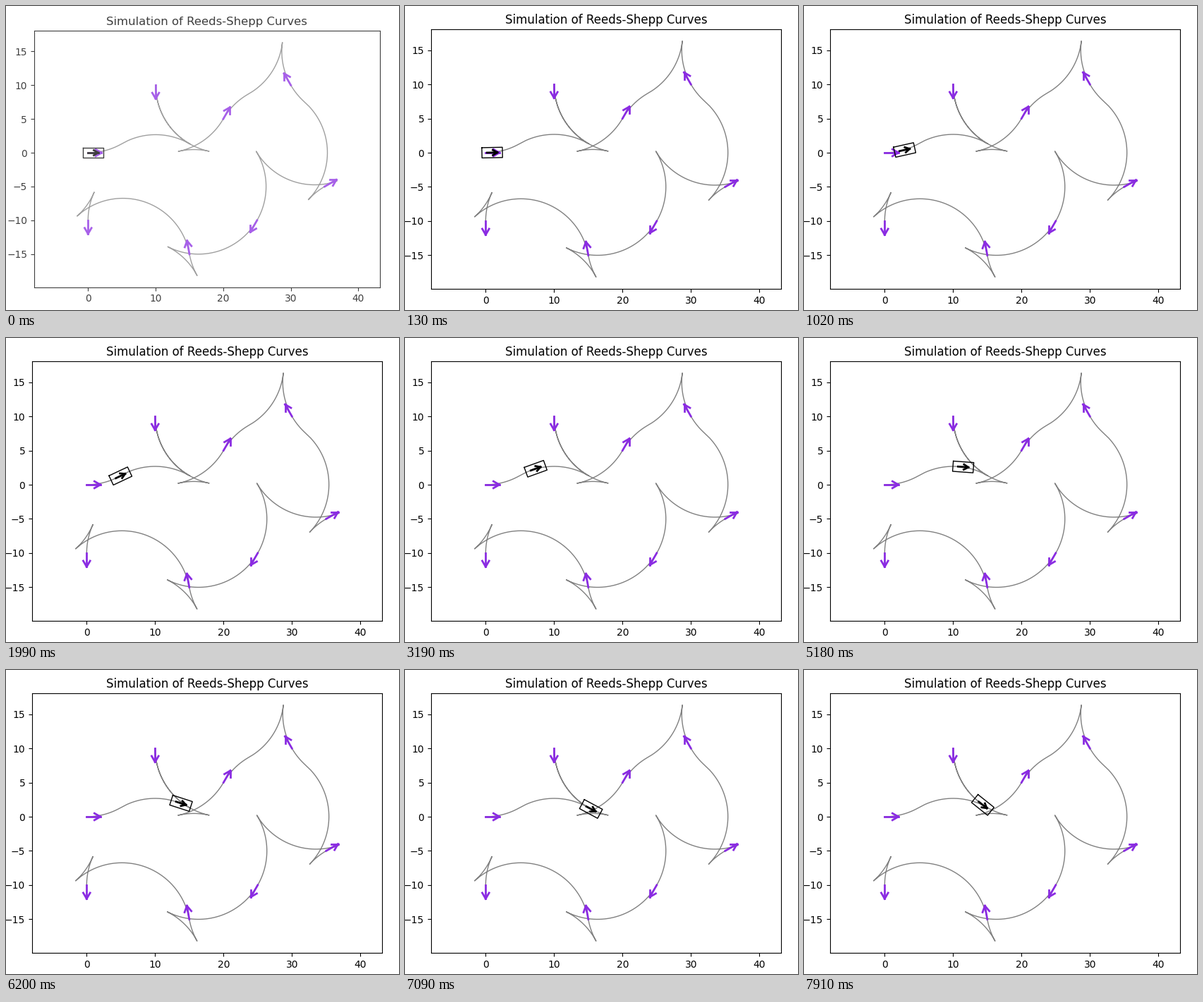
Animation, 557 px wide and 431 px high, one loop 8 s. Source, as a matplotlib script:

```python
import numpy as np
import matplotlib.pyplot as plt
from matplotlib.animation import FuncAnimation
from matplotlib.patches import Rectangle

W, H, DPI = 557, 431, 100
INTERVAL, LOOP = 20, 8000
RADIUS, STEP = 10.0, 0.2
CAR_W, CAR_L = 1.5, 3.0

STATES = [(0, 0, 0), (10, 10, -90), (20, 5, 60), (30, 10, 120),
          (35, -5, 30), (25, -10, -120), (15, -15, 100), (0, -10, -90)]

# per leg: outer turn (1 left, -1 right), side of the middle circle, gears
LEGS = [(1, -1, (1, 1, -1)), (1, 1, (1, -1, 1)), (-1, 1, (1, 1, -1)),
        (-1, -1, (-1, -1, 1)), (-1, -1, (1, -1, 1)), (-1, -1, (1, -1, 1)),
        (1, 1, (1, -1, 1))]

# (ms, path point reached by the car), linear in between
PACE = np.array([
    (0, 0), (130, 1), (260, 2), (840, 9), (920, 10), (1710, 19), (1810, 20),
    (1990, 22), (2550, 28), (2630, 29), (3190, 35), (3370, 37), (3470, 38),
    (4210, 46), (4310, 47), (5000, 55), (5130, 56), (5920, 65), (6020, 66),
    (6200, 68), (6710, 74), (6840, 75), (7630, 84), (7730, 85), (7910, 87)])

# axes box in pixels, and the window's opening zoom
BOX = (37, 30, 496, 368.06)
ZOOM, CENTER, OPEN_MS = 0.988, (277, 216), 50


def left_of(yaw):
    return np.array([-np.sin(yaw), np.cos(yaw)])


def leg_points(start, goal, turn, side, gears):
    """Three tangent arcs between two poses, sampled every STEP."""
    (p0, h0), (p3, h3) = [(np.array(s[:2], float), np.deg2rad(s[2]))
                          for s in (start, goal)]
    c1 = p0 + turn * RADIUS * left_of(h0)
    c3 = p3 + turn * RADIUS * left_of(h3)
    d = c3 - c1
    dist = np.hypot(*d)
    rise = np.sqrt(4 * RADIUS**2 - dist**2 / 4)
    c2 = (c1 + c3) / 2 + side * rise * np.array([-d[1], d[0]]) / dist

    def joint(c):
        n = -turn * (c2 - c)
        return np.arctan2(-n[0], n[1])

    heads = [h0, joint(c1), joint(c3), h3]
    points = [(*p0, h0)]
    pos = gears[0] * STEP
    for i, (c, gear) in enumerate(zip((c1, c2, c3), gears)):
        k = turn * (-1)**i
        length = RADIUS * ((k * gear * (heads[i + 1] - heads[i])) % (2 * np.pi))
        while abs(pos) <= length:
            yaw = heads[i] + k * pos / RADIUS
            points.append((*(c - k * RADIUS * left_of(yaw)), yaw))
            pos += gear * STEP
        pos -= gear * length  # leftover carries into the next arc
    points.append((*p3, h3))
    return points


def arrow_lines(x, y, yaw, size):
    tip = np.array([x + size * np.cos(yaw), y + size * np.sin(yaw)])
    lines = [([x, tip[0]], [y, tip[1]])]
    for spread in (-np.pi / 6, np.pi / 6):
        a = yaw + np.pi + spread
        lines.append(([tip[0], tip[0] + size / 2 * np.cos(a)],
                      [tip[1], tip[1] + size / 2 * np.sin(a)]))
    return lines


def car_outline(x, y, yaw):
    u = np.array([-1, -1, 3, 3, -1]) * CAR_L / 4
    v = np.array([1, -1, -1, 1, 1]) * CAR_W / 2
    c, s = np.cos(yaw), np.sin(yaw)
    return x + u * c - v * s, y + u * s + v * c


path = np.array([p for a, b, leg in zip(STATES, STATES[1:], LEGS)
                 for p in leg_points(a, b, *leg)])

# the small excess keeps the pixel size from rounding down
fig = plt.figure(figsize=((W + 0.01) / DPI, (H + 0.01) / DPI), dpi=DPI,
                 facecolor="white")
ax = fig.add_axes([0, 0, 1, 1])
title = ax.set_title("Simulation of Reeds-Shepp Curves")

ax.plot(path[:, 0], path[:, 1], lw=1, color="gray")
for x, y, deg in STATES:
    for xs, ys in arrow_lines(x, y, np.deg2rad(deg), 2):
        ax.plot(xs, ys, lw=2, color="blueviolet")
outline, = ax.plot([], [], lw=1, color="black")
pointer = [ax.plot([], [], lw=2, color="black")[0] for _ in range(3)]

# equal scale on both axes, 5 % margin above and below the path
lo, hi = path[:, 1].min(), path[:, 1].max()
pad = 0.05 * (hi - lo)
half = (hi - lo + 2 * pad) * BOX[2] / BOX[3] / 2
mid = (path[:, 0].min() + path[:, 0].max()) / 2
ax.set_xlim(mid - half, mid + half)
ax.set_ylim(lo - pad, hi + pad)
ax.set_xticks(range(0, 41, 10))
ax.set_yticks(range(-15, 16, 5))

veil = Rectangle((0, 0), 1, 1, transform=fig.transFigure, fc="white",
                 ec="none", alpha=0.25, zorder=100)
fig.add_artist(veil)


def set_zoom(z):
    x, y = (c + z * (b - c) for b, c in zip(BOX, CENTER))
    ax.set_position([x / W, y / H, z * BOX[2] / W, z * BOX[3] / H])
    title.set_fontsize(12 * z)
    ax.tick_params(labelsize=10 * z)


def update(i):
    t = i * INTERVAL + INTERVAL / 2
    opening = t < OPEN_MS
    veil.set_visible(opening)
    set_zoom(ZOOM if opening else 1)

    pose = path[int(np.interp(t, PACE[:, 0], PACE[:, 1]) + 1e-9)]
    outline.set_data(*car_outline(*pose))
    for line, xy in zip(pointer, arrow_lines(*pose, CAR_L / 2)):
        line.set_data(*xy)
    return [outline, *pointer, veil]


anim = FuncAnimation(fig, update, frames=LOOP // INTERVAL, interval=INTERVAL,
                     init_func=lambda: update(0), repeat=True, repeat_delay=0)
plt.show()
```
